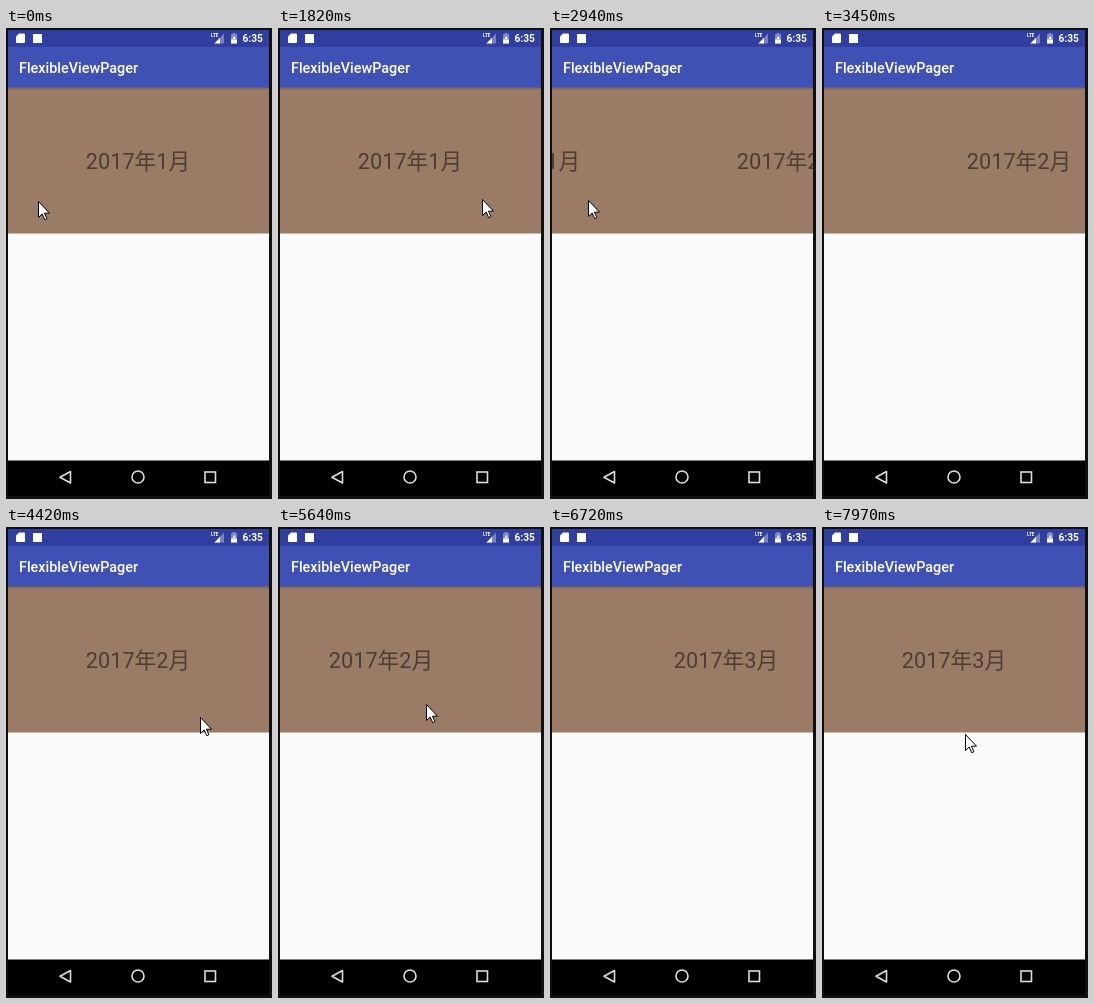
Write an HTML page that moves like this. It is 266 px wide and 471 px high and loops after 8000 ms.

```html
<!DOCTYPE html>
<html lang="zh">
<head>
<meta charset="utf-8">
<style>
  html, body { margin: 0; width: 100%; height: 100%; overflow: hidden; background: #111; }
  svg { display: block; }
  text { font-family: Roboto, "Noto Sans CJK SC", "Noto Sans CJK", sans-serif; }
  .month { font-size: 21.7px; fill: #4d3d33; text-anchor: middle; }
  .nav { fill: none; stroke: #ddd; stroke-width: 1.6; }
</style>
</head>
<body>
<svg width="266" height="471" viewBox="0 0 266 471">
  <defs>
    <clipPath id="pager"><rect x="2" y="60" width="261" height="145"/></clipPath>
    <linearGradient id="shade" x2="0" y2="1">
      <stop stop-opacity=".2"/><stop offset="1" stop-opacity="0"/>
    </linearGradient>
  </defs>
  <rect width="266" height="471" fill="#111"/>
  <rect x="2" y="2" width="261" height="17" fill="#303f9f"/>
  <rect x="2" y="19" width="261" height="41" fill="#3f51b5"/>
  <rect x="2" y="205" width="261" height="228" fill="#fafafa"/>
  <rect x="2" y="59.5" width="261" height="146" fill="#9a7b66"/>
  <rect x="2" y="59.5" width="261" height="3" fill="url(#shade)"/>
  <rect x="2" y="432.5" width="261" height="35.5"/>

  <!-- status bar -->
  <g fill="#fff">
    <path d="M13 5.500h5q1 0 1 1v7.500q0 1-1 1h-7q-1 0-1-1V8.500z"/>
    <rect x="27" y="6" width="9" height="9"/>
    <text x="205" y="9" font-size="4.6" font-weight="700">LTE</text>
    <path d="M218 5.500V15.500H208.500z" opacity=".35"/>
    <path d="M214 9.700V15.500H208.500z"/>
    <path d="M226.500 5h3v1.200h1.500V15.500h-6V6.200h1.500z" opacity=".4"/>
    <path d="M225 11.500h6v4h-6zM228.500 7.500l-2 3.500h1.300v2l2-3.500h-1.300z"/>
    <text x="236.500" y="14" font-size="10.2" font-weight="700">6:35</text>
    <text x="13" y="45" font-size="14.4" font-weight="500">FlexibleViewPager</text>
  </g>

  <g class="nav">
    <path d="M64.500 443.500v11.500L54 449.250z" stroke-linejoin="round"/>
    <circle cx="132" cy="449" r="6"/>
    <rect x="199" y="444" width="10.500" height="10.500"/>
  </g>

  <g clip-path="url(#pager)"><g id="pages"></g></g>
  <path id="cursor" d="M.5.5V16.500L4.200 13L6.700 18.700L8.900 17.700L6.500 12.200H11.500z" fill="#fff" stroke="#000"/>
</svg>
<script>
const LOOP = 8000, PAGE = 261, STEP = 133;
const MOVES = [0, 280, 1820, 4150, 5490, 7550]; // when each gesture begins
const pages = document.getElementById("pages");
const cursor = document.getElementById("cursor");

pages.innerHTML = [1, 2, 3].map((m, i) =>
  `<text class="month" x="${132 + i * PAGE}" y="140.5">2017年${m}月</text>`).join("");

// pointer tip: time, x, y; negative x parks it off screen
const path = [
  [0, 32, 173], [540, 211, 173], [1800, 211, 173],
  [1820, 204, 171], [2100, 127, 170], [2485, 90, 171], [3283, -14, 172], [4149, -14, 184],
  [4150, 5, 184], [4416, 194, 190], [4815, 223, 174], [5480, 223, 174],
  [5490, 209, 174], [5623, 148, 177], [5889, 84, 179], [6600, -14, 181], [7540, -14, 198],
  [7550, -5, 198], [7683, 60, 208], [7949, 143, 207]
];

// the screen refreshes every STEP ms, counted from the start of the gesture
function snap(t) {
  const start = MOVES.findLast(s => s <= t);
  return start && start + Math.floor((t - start) / STEP) * STEP;
}

function pointAt(t) {
  const i = path.findLastIndex(p => p[0] <= t);
  const a = path[i], b = path[i + 1] || a;
  const u = (t - a[0]) / (b[0] - a[0] || 1);
  return [1, 2].map(n => Math.round(a[n] + (b[n] - a[n]) * u));
}

// a slowing drag, then the pager settles on the next page
function swipe(t, start, steps, drag, power) {
  const k = Math.max(0, (t - start) / STEP);
  return k <= steps
    ? drag * (1 - (1 - k / steps) ** power)
    : PAGE - (PAGE - drag) * 0.2 ** (k - steps);
}

function draw(now) {
  const t = snap(now % LOOP);
  const scroll = swipe(t, 1820, 12, 196, 1.4) + swipe(t, 5490, 9, 217, 1.22);
  pages.setAttribute("transform", `translate(${-Math.round(scroll)} 0)`);
  cursor.setAttribute("transform", `translate(${pointAt(t)})`);
  requestAnimationFrame(draw);
}
draw(0);
</script>
</body>
</html>
```
